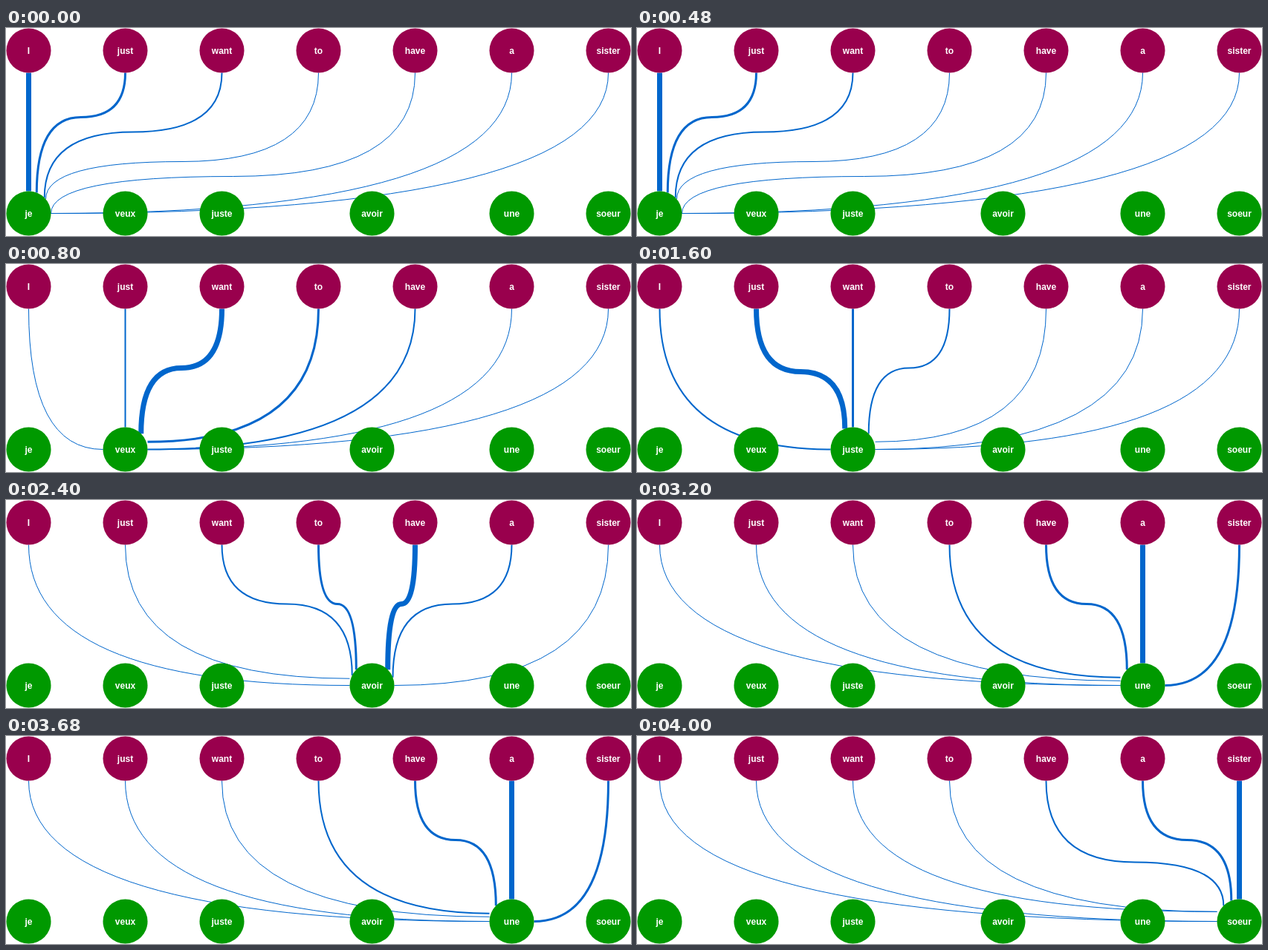
Animation of 841 by 281 pixels, one loop 4800 ms. Source, as an HTML page:

```html
<!DOCTYPE html>
<html lang="en">
<head>
<meta charset="utf-8">
<title>Word alignment</title>
<style>
  html, body { margin: 0; width: 100%; height: 100%; overflow: hidden; background: #fff; }
  svg { display: block; }
  text { font: bold 12px "Liberation Sans", Arial, sans-serif; fill: #fff; text-anchor: middle; }
  .links { fill: none; stroke: #06c; visibility: hidden; animation: turn 4.8s step-end infinite; }
  @keyframes turn {
    0% { visibility: visible; }
    16.6667%, 100% { visibility: hidden; }
  }
</style>
</head>
<body>
<svg id="stage" width="841" height="281" viewBox="0 0 841 281"></svg>
<script>
const TOP = 30, BOTTOM = 250, R = 30, GAP = 130, STEP = 0.8;
const column = i => R + GAP * i;

const english = ['I', 'just', 'want', 'to', 'have', 'a', 'sister'];

// focus: the matching word; weak: the side (-1 left, 1 right) that fades sooner.
// ports: where a link docks, in degrees from the top of the circle,
// and the height of its bend if it has one. Other links dock at the side.
const french = [
  { word: 'je', x: column(0), focus: 'I',
    ports: { just: [21, 120], want: [45, 140], to: [50, 180], have: [90, 200] } },
  { word: 'veux', x: column(1), focus: 'want', weak: -1,
    ports: { want: [45, 140], to: [70] } },
  { word: 'juste', x: column(2), focus: 'just', weak: -1,
    ports: { just: [21, 145], to: [45, 140], have: [70] } },
  { word: 'avoir', x: 492, focus: 'have', weak: 1,
    ports: { just: [72], want: [63, 140], to: [45, 140], have: [45, 140], a: [69, 140] } },
  { word: 'une', x: column(5), focus: 'a',
    ports: { want: [78], to: [69], have: [45, 140] } },
  { word: 'soeur', x: column(6), focus: 'sister',
    ports: { want: [64], to: [64], have: [45, 170], a: [21, 140] } }
];

function add(parent, tag, attrs) {
  const el = document.createElementNS('http://www.w3.org/2000/svg', tag);
  for (const key in attrs) el.setAttribute(key, attrs[key]);
  return parent.appendChild(el);
}

// Links get thinner with each word away from the focus.
function linkWidth(j, { focus, weak }) {
  const offset = j - english.indexOf(focus);
  const steps = Math.abs(offset) + (Math.sign(offset) === weak ? 1 : 0);
  return steps ? Math.max(1, 4 - steps) : 7;
}

function linkPath(x, target, [angle, bend] = [90]) {
  const start = `M${x} ${TOP + R}`;
  if (x === target) return `${start}V${BOTTOM - R}`;
  const side = Math.sign(x - target);
  const turn = angle * Math.PI / 180;
  const endY = BOTTOM - R * Math.cos(turn);
  if (!bend) return `${start}Q${x} ${endY} ${target + side * R} ${endY}`;
  const endX = target + side * R * Math.sin(turn);
  return `${start}Q${x} ${bend} ${(x + endX) / 2} ${bend}T${endX} ${endY}`
    .replace('T', `Q${endX} ${bend} `);
}

function addNode(word, x, y, fill) {
  add(root, 'circle', { cx: x, cy: y, r: R, fill });
  add(root, 'text', { x, y: y + 4.5 }).textContent = word;
}

const root = add(document.getElementById('stage'), 'g', { transform: 'translate(.5 .5)' });

french.forEach((item, i) => {
  const group = add(root, 'g', { class: 'links' });
  group.style.animationDelay = `${((i - french.length) * STEP).toFixed(1)}s`;
  english.forEach((word, j) => add(group, 'path', {
    d: linkPath(column(j), item.x, item.ports[word]),
    'stroke-width': linkWidth(j, item)
  }));
});
english.forEach((word, j) => addNode(word, column(j), TOP, '#99004d'));
french.forEach(({ word, x }) => addNode(word, x, BOTTOM, '#090'));
</script>
</body>
</html>
```
